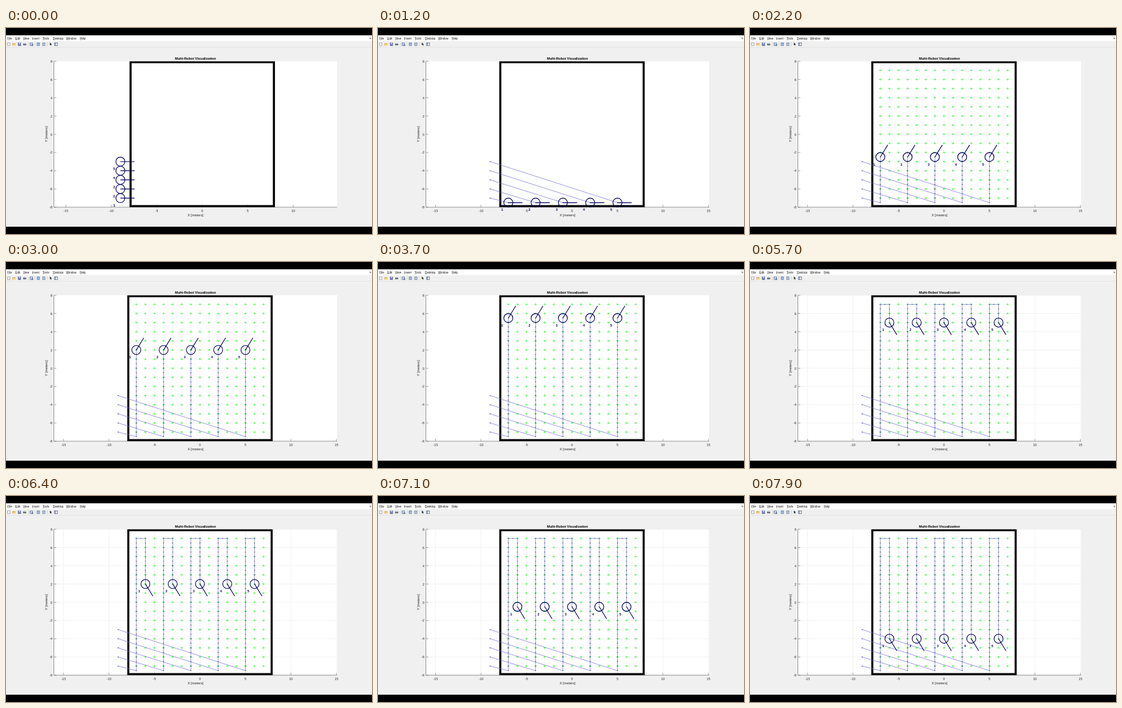
Animation of 600 by 338 pixels, one loop 8000 ms. Source, as an HTML page with a canvas:

```html
<!DOCTYPE html>
<html lang="en">
<head>
<meta charset="utf-8">
<title>Robot coverage plot</title>
<style>
html, body { margin: 0; width: 100%; height: 100%; overflow: hidden; background: #000; }
canvas { display: block; width: 600px; height: 338px; }
</style>
</head>
<body>
<canvas id="stage"></canvas>
<script>
const LOOP = 8000, TICK = 100;
const SCALE_X = 14.91, SCALE_Y = 14.97, ZERO_Y = 174.3;
const AX = { l: 78.5, t: 54.5, r: 543, b: 294 };
const NAVY = '#000060', INK = '#262626', GREEN = '#58f858';
const ARROW = 1.56, TILT = 58.4 * Math.PI / 180;
const FONT = '"Liberation Sans", Arial, sans-serif';

// [time, half-metre steps travelled along the sweep]
const PACE = [[1200, 0], [2200, 10], [3700, 26], [4000, 29], [5000, 29],
              [6400, 41], [7600, 50], [7900, 53]];
const UP_END = 29, SIDE_END = 31;

const canvas = document.getElementById('stage');
const dpr = window.devicePixelRatio || 1;
canvas.width = 600 * dpr;
canvas.height = 338 * dpr;
const c = canvas.getContext('2d');
c.scale(dpr, dpr);

let zeroX = 318;
const px = x => zeroX + x * SCALE_X;
const py = y => ZERO_Y - y * SCALE_Y;

function rect(x, y, w, h, fill) {
  c.fillStyle = fill;
  c.fillRect(x, y, w, h);
}

function line(points, color, width) {
  c.beginPath();
  points.forEach(([x, y]) => c.lineTo(x, y));
  c.strokeStyle = color;
  c.lineWidth = width;
  c.stroke();
}

function text(str, x, y, size, align = 'center', color = INK, weight = '') {
  c.font = `${weight} ${size}px ${FONT}`;
  c.textAlign = align;
  c.textBaseline = 'alphabetic';
  c.fillStyle = color;
  c.fillText(str, x, y);
}

function dot(x, y, r, color) {
  c.beginPath();
  c.arc(x, y, r, 0, 7);
  c.fillStyle = color;
  c.fill();
}

function stepsAt(t) {
  if (t <= PACE[0][0]) return 0;
  for (let i = 1; i < PACE.length; i++) {
    const [t0, s0] = PACE[i - 1], [t1, s1] = PACE[i];
    if (t <= t1) return Math.round(s0 + (s1 - s0) * (t - t0) / (t1 - t0));
  }
  return PACE[PACE.length - 1][1];
}

// Offset and heading within a robot's own lane
function pose(s) {
  if (s === 0) return { dx: 0, y: -7.5, a: 0 };
  if (s <= UP_END) return { dx: 0, y: -7.5 + s / 2, a: TILT };
  if (s <= SIDE_END) return { dx: (s - UP_END) / 2, y: 7, a: 0 };
  return { dx: 1, y: 7 - (s - SIDE_END) / 2, a: -TILT };
}

function drawIcons() {
  const box = (x, fill, edge) => {
    rect(x - 2.3, 24, 4.6, 5.2, edge);
    rect(x - 1.6, 24.7, 3.2, 3.8, fill);
  };
  box(4.5, '#fff', '#8a93a5');
  rect(10.5, 25, 5, 4, '#d9ab45');
  rect(11.3, 26.3, 4.8, 2.8, '#f6d983');
  box(22, '#7d86bd', '#3b4480');
  rect(21, 24.4, 2.2, 1.8, '#e4e8f5');
  rect(28, 25.6, 5.2, 2.8, '#666d78');
  rect(29, 24, 3.2, 1.8, '#cdd5e2');
  box(41.5, '#cfdcf0', '#53698e');
  rect(41.8, 26.8, 2.8, 2.6, '#6b7a94');
  box(53, '#a9c8ea', '#46648f');
  box(62, '#f7f9fc', '#526080');
  rect(60.8, 25.5, 2.4, .7, '#5b80b8');
  rect(60.8, 27.2, 2.4, .7, '#5b80b8');
  c.beginPath();
  [[71.8, 23.7], [71.8, 28.5], [73, 27.4], [74, 29.3], [74.7, 28.9], [73.8, 27.1], [75.3, 27]]
    .forEach(p => c.lineTo(...p));
  c.closePath();
  c.fillStyle = '#333';
  c.fill();
  rect(79, 24, 6, 5.2, '#4f5d78');
  rect(79.7, 24.8, 1.5, 3.7, '#c9d6ea');
  rect(81.8, 24.8, 2.5, 3.7, '#f8fafc');
  for (const x of [36.7, 47.5, 67.5]) rect(x, 23.5, .6, 6.5, '#c4c4c4');
}

function drawWindow() {
  rect(0, 0, 600, 338, '#000');
  rect(0, 12, 600, 314, '#f0f0f0');
  rect(0, 12, 600, 9.5, '#fff');
  rect(0, 31.5, 600, .6, '#dcdcdc');
  const menu = { File: 2.3, Edit: 15.3, View: 28, Insert: 43, Tools: 60, Desktop: 77, Window: 98.6, Help: 121 };
  for (const name in menu) {
    text(name, menu[name], 18.6, 4.7, 'left', '#111');
    rect(menu[name], 19.1, c.measureText(name[0]).width, .4, '#555');
  }
  line([[595.7, 15.5], [598, 17.6]], '#555', .7);
  line([[598, 16], [598, 17.8], [596.2, 17.8]], '#555', .7);
  drawIcons();
}

function drawAxes(grid) {
  rect(AX.l, AX.t, AX.r - AX.l, AX.b - AX.t, '#fff');
  const axis = '#6a6a6a';
  for (let x = -15; x <= 15; x += 5) {
    if (px(x) > AX.r) continue;
    if (grid) line([[px(x), AX.t], [px(x), AX.b]], '#ececec', .7);
    line([[px(x), AX.b], [px(x), AX.b - 4]], axis, .6);
    text(x, px(x), 301.6, 5.3);
  }
  for (let y = -8; y <= 8; y += 2) {
    if (grid) line([[AX.l, py(y)], [AX.r, py(y)]], '#ececec', .7);
    line([[AX.l, py(y)], [AX.l + 4, py(y)]], axis, .6);
    text(y, 76, py(y) + 2.2, 5.3, 'right');
  }
  line([[AX.l, AX.t], [AX.l, AX.b], [AX.r, AX.b]], axis, .7);
  text('Multi-Robot Visualization', 310.6, 51.6, 5.65, 'center', '#000', 'bold');
  text('X [meters]', 310.7, 309, 5.7);
  c.save();
  c.translate(68.4, 174.2);
  c.rotate(-Math.PI / 2);
  text('Y [meters]', 0, 0, 5.7);
  c.restore();
}

function drawTargets() {
  for (let x = -7; x <= 7; x++) {
    for (let y = -7; y <= 7; y++) {
      const X = px(x), Y = py(y);
      line([[X - 2, Y], [X + 2, Y]], GREEN, 1);
      line([[X, Y - 1.8], [X, Y + 1.8]], GREEN, .8);
      dot(X, Y, 1.1, GREEN);
    }
  }
}

function drawTrail(k, lane, s) {
  const start = [px(-9), py(k - 8)];
  const pts = [start];
  for (let i = 0; i <= s; i++) {
    const p = pose(i);
    pts.push([px(lane + p.dx), py(p.y)]);
  }
  line(pts, '#7878d4', .75);
  pts.forEach(([x, y]) => dot(x, y, .8, '#40408c'));
}

function drawRobot(k, x, y, a) {
  const X = px(x), Y = py(y);
  c.beginPath();
  c.arc(X, Y, 7.4, 0, 7);
  c.strokeStyle = NAVY;
  c.lineWidth = 1.15;
  c.stroke();
  line([[X, Y], [X + ARROW * SCALE_X * Math.cos(a), Y - ARROW * SCALE_Y * Math.sin(a)]], NAVY, 1.15);
}

function draw(time) {
  const t = Math.floor(time / TICK) * TICK;
  const parked = t < 100;
  const s = stepsAt(t), p = pose(s);
  zeroX = parked ? 321.7 : 318;

  drawWindow();
  drawAxes(t > 5000);

  const robots = [1, 2, 3, 4, 5].map(k => {
    const lane = 3 * k - 10;
    return parked ? { k, lane, x: -9, y: k - 8, a: 0 }
                  : { k, lane, x: lane + p.dx, y: p.y, a: p.a };
  });

  c.save();
  c.beginPath();
  c.rect(AX.l, AX.t, AX.r - AX.l, AX.b - AX.t + .5);
  c.clip();
  c.strokeStyle = '#000';
  c.lineWidth = 3.4;
  c.strokeRect(px(-7.88), py(7.9), 15.76 * SCALE_X, 15.78 * SCALE_Y);
  if (s > 0) drawTargets();
  if (!parked) robots.forEach(r => drawTrail(r.k, r.lane, s));
  robots.forEach(r => drawRobot(r.k, r.x, r.y, r.a));
  c.restore();

  robots.forEach(r => text(r.k, px(r.x) - 10.2, py(r.y) + 13.8, 5.4, 'center', NAVY, 'bold'));
}

const begin = performance.now();
function loop() {
  draw((performance.now() - begin) % LOOP);
  requestAnimationFrame(loop);
}
loop();
</script>
</body>
</html>
```
